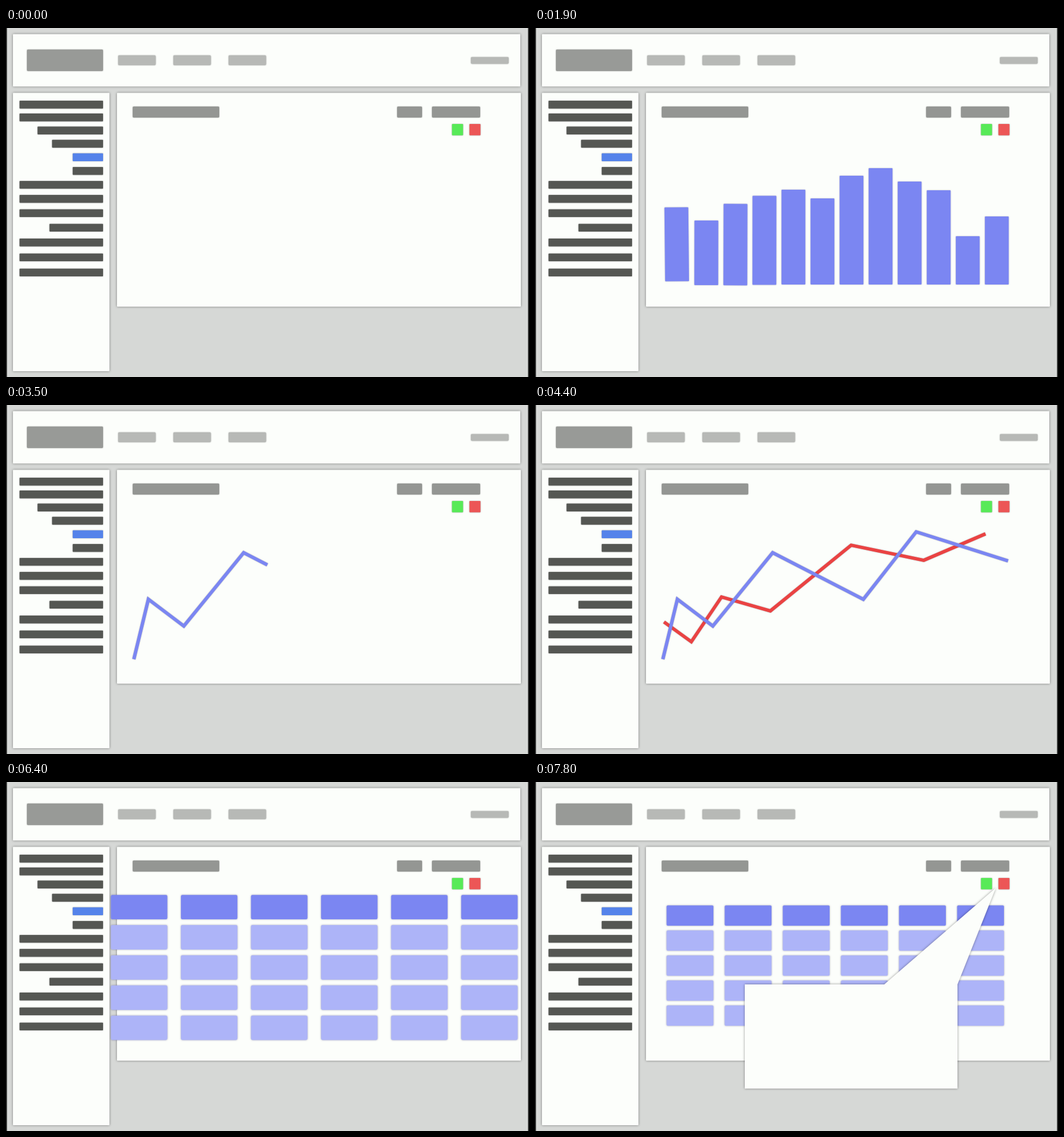
Animation of 900 by 600 pixels, one loop 8000 ms. Source, as an HTML page with a canvas:

```html
<!DOCTYPE html>
<html lang="en">
<head>
<meta charset="utf-8">
<title>Dashboard</title>
<style>
html, body { margin: 0; width: 100%; height: 100%; overflow: hidden; background: #d6d8d6; }
canvas { display: block; }
</style>
</head>
<body>
<canvas id="stage" width="900" height="600"></canvas>
<script>
const LOOP = 8000, STEP = 100, LAST = 7800, STAGGER = 66.7, BASE = 441;
const WHITE = '#fcfefb', BLUE = '#7b86f2', PALE = '#adb4f8', RED = '#ea4343';
const BAR_HEIGHTS = [127, 111, 140, 153, 163, 148, 187, 200, 177, 162, 83, 117];
const BLUE_LINE = [[220, 437], [245, 334], [306, 380], [409, 254], [565, 334], [656, 218], [814, 268]];
const RED_LINE = [[222, 373], [269, 407], [321, 330], [405, 354], [544, 241], [669, 267], [802, 210]];

const ctx = document.getElementById('stage').getContext('2d');
const layer = new OffscreenCanvas(900, 600);
const lctx = layer.getContext('2d');
const clamp = v => Math.max(0, Math.min(1, v));
const mix = (p, q, f) => p.map((v, k) => v + (q[k] - v) * f);

// Distance from rest: rushes in until u = 0, then overshoots and settles.
function spring(u) {
  const w = 0.01257;
  return u < 0 ? -w * u + 0.000155 * u * u : -Math.sin(w * u) * Math.exp(-0.0141 * u);
}

function block(x, y, w, h, color, r = 2) {
  ctx.fillStyle = color;
  ctx.beginPath();
  ctx.roundRect(x, y, w, h, r);
  ctx.fill();
}

function shadowed(blur, color, draw) {
  ctx.save();
  ctx.shadowBlur = blur;
  ctx.shadowColor = color;
  draw();
  ctx.restore();
}

function drawPage() {
  ctx.fillStyle = '#1c1d1c';
  ctx.fillRect(0, 0, 900, 600);
  ctx.fillStyle = '#d6d8d6';
  ctx.fillRect(1.6, 0, 896.8, 600);
  shadowed(4, 'rgba(0,0,0,.42)', () => {
    block(12, 10.5, 873, 90, WHITE, 1);
    block(12, 111.5, 166, 478.5, WHITE, 1);
    block(191, 111.5, 695, 367.5, WHITE, 1);
  });
  shadowed(2, 'rgba(60,60,60,.5)', () => {
    block(36, 37, 131, 37, '#989a97');
    for (let i = 0; i < 3; i++) block(193 + 95 * i, 47, 64.5, 17, '#b7b9b6');
    block(800, 50, 65, 11.5, '#b7b9b6');
    block(218, 135, 149, 19, '#949693');
    block(673, 135, 43, 19, '#949693');
    block(733, 135, 83, 19, '#949693');
    block(767.5, 165, 19, 19.5, '#58ea58', 1);
    block(797.5, 165, 19, 19.5, '#ec5656', 1);
    const indent = { 2: 31, 3: 56, 4: 91.5, 5: 91.5, 9: 51.5 };
    for (let i = 0; i < 13; i++) {
      const dx = indent[i] || 0;
      block(23.3 + dx, 125 + 21.9 * i + 0.18 * i * i, 143.7 - dx, 13.4, i === 4 ? '#5583ea' : '#555753', 1);
    }
  });
}

function drawBars(t) {
  lctx.clearRect(0, 0, 900, 600);
  lctx.globalCompositeOperation = 'lighter';
  lctx.fillStyle = BLUE;
  BAR_HEIGHTS.forEach((h, i) => {
    const local = t - STAGGER * i;
    const u = Math.min(local, 2295 - local) - 193;     // leaving is arriving reversed
    if (u < -133) return;
    const samples = u < 40 ? 15 : 1;                   // motion blur while fast
    lctx.globalAlpha = 1 / samples;
    for (let k = 0; k < samples; k++) {
      const e = 172 * spring(u + 11 * ((k + 0.5) / samples - 0.5));
      lctx.save();
      lctx.translate(244.7 + 50 * i + 0.145 * e, BASE - h / 2 + e);
      lctx.rotate(e * 0.1 * Math.PI / 180);
      lctx.beginPath();
      lctx.roundRect(-20.5, -h / 2, 41, h, 1);
      lctx.fill();
      lctx.restore();
    }
  });
  shadowed(2, 'rgba(60,60,110,.4)', () => ctx.drawImage(layer, 0, 0));
}

// Strokes the part of a polyline between two fractions of its length.
function drawLine(points, from, to, color) {
  if (to <= from) return;
  const lengths = points.slice(1).map((p, i) => Math.hypot(p[0] - points[i][0], p[1] - points[i][1]));
  const total = lengths.reduce((a, b) => a + b);
  let pos = 0;
  const path = [];
  lengths.forEach((len, i) => {
    const a = Math.max(0, (from * total - pos) / len), b = Math.min(1, (to * total - pos) / len);
    pos += len;
    if (b <= a) return;
    if (!path.length) path.push(mix(points[i], points[i + 1], a));
    path.push(mix(points[i], points[i + 1], b));
  });
  ctx.beginPath();
  path.forEach(p => ctx.lineTo(...p));
  ctx.strokeStyle = color;
  ctx.lineWidth = 5.8;
  shadowed(2, 'rgba(60,60,60,.4)', () => ctx.stroke());
}

function drawLines(t) {
  drawLine(RED_LINE, clamp((t - 5446) / 782), clamp((t - 3538) / 900), RED);
  drawLine(BLUE_LINE, clamp((t - 5040) / 782), clamp((t - 3078) / 900), BLUE);
}

function drawTable(t) {
  const scale = 1 - 0.7 * spring(t - 6340);
  if (t < 6200 || scale <= 0) return;
  ctx.save();
  ctx.translate(450, 300);
  ctx.scale(scale, scale);
  ctx.translate(-450, -300);
  shadowed(3, 'rgba(60,60,120,.5)', () => {
    for (let row = 0; row < 5; row++)
      for (let col = 0; col < 6; col++)
        block(226.5 + 100 * col, 212.3 + 43 * row, 80.5, 34.7, row ? PALE : BLUE);
  });
  ctx.restore();
}

function drawBubble(t) {
  const left = 361, right = 727, top = 348, bottom = 527;
  ctx.save();
  ctx.globalAlpha = clamp((t - 6950) / 850);
  ctx.fillStyle = WHITE;
  ctx.beginPath();
  ctx.moveTo(left, top);
  ctx.lineTo(601, top);
  ctx.lineTo(793, 182);
  ctx.lineTo(right, top);
  ctx.lineTo(right, bottom);
  ctx.lineTo(left, bottom);
  ctx.closePath();
  shadowed(4, 'rgba(0,0,0,.42)', () => ctx.fill());
  ctx.restore();
}

function frame(now) {
  const t = Math.min(LAST, Math.floor((now % LOOP) / STEP) * STEP);
  drawPage();
  drawBars(t);
  drawLines(t);
  drawTable(t);
  drawBubble(t);
  requestAnimationFrame(frame);
}
requestAnimationFrame(frame);
</script>
</body>
</html>
```
